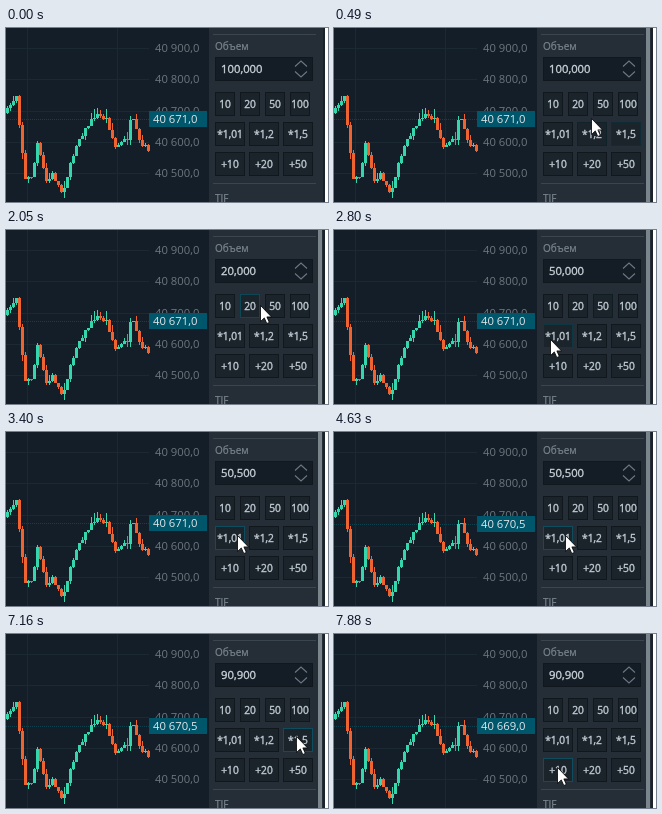
An HTML page that plays this animation: 322x174 px, repeating every 8 s.

```html
<!DOCTYPE html>
<html lang="ru">
<head>
<meta charset="utf-8">
<title>Объем</title>
<style>
html, body { margin: 0; width: 100%; height: 100%; overflow: hidden; background: #fff; }
svg { display: block; width: 322px; height: 174px; }
text { font-family: "Open Sans", "Noto Sans", sans-serif; font-size: 11.3px; }
.axis { fill: #6d777f; }
.label { fill: #7b868f; font-size: 10px; stroke: #7b868f; stroke-width: .2; }
.price { fill: #e3e7ea; }
.value { fill: #c9d1d8; stroke: #c9d1d8; stroke-width: .35; }
.btn { fill: #1b232b; stroke: #10171d; }
.key { fill: #bfc9d1; stroke: #bfc9d1; stroke-width: .4; font-size: 10.2px; text-anchor: middle; }
.glow { fill: none; stroke: #0d4d5d; }
.grid { stroke: #1c2933; }
</style>
</head>
<body>
<svg id="stage" viewBox="0 0 322 174"></svg>
<script>
const LOOP = 8000;
const stage = document.getElementById('stage');

function add(tag, attrs, text, parent = stage) {
  const el = document.createElementNS('http://www.w3.org/2000/svg', tag);
  for (const k in attrs) el.setAttribute(k, attrs[k]);
  if (text) el.textContent = text;
  parent.appendChild(el);
  return el;
}
const rect = (x, y, width, height, rest) => add('rect', { x, y, width, height, ...rest });
const text = (x, y, cls, s, parent) => add('text', { x, y, class: cls }, s, parent);
const path = (d, rest) => add('path', { d, ...rest });
const clamp = v => Math.max(0, Math.min(1, v));
const ease = p => p * p * (3 - 2 * p);

// Chart
rect(0, 0, 204, 174, { fill: '#141e28' });
path('M0 20.5H143M0 51.5H143M0 83.5H143M0 114.5H143M0 145.5H143M21.5 0V174M111.5 0V174', { class: 'grid' });
const priceLine = path('M0 .5H143', { stroke: '#12414e', 'stroke-dasharray': '1 1' });

// Turning points of the price, joined by straight runs with seeded noise
const turns = [[0, 82], [9, 67], [18, 152], [25, 147], [30, 116], [40, 157], [44, 144],
  [55, 165], [70, 113], [88, 87], [99, 91], [108, 119], [121, 110], [124, 86], [133, 117], [144, 122]];
let seed = 7;
const rand = () => (seed = seed * 16807 % 2147483647) / 2147483647;

function trend(x) {
  const i = turns.findIndex(p => p[0] > x);
  const [x0, y0] = turns[i - 1], [x1, y1] = turns[i];
  return y0 + (y1 - y0) * (x - x0) / (x1 - x0);
}

let open = 85;
for (let x = 0; x < 143; x += 3) {
  const close = Math.round(trend(x) + (rand() - .5) * 5);
  const top = Math.min(open, close);
  const bottom = Math.max(open, close, top + 1);
  const high = top - Math.round(rand() * rand() * 9);
  const low = bottom + Math.round(rand() * rand() * 7);
  const fill = close < open ? '#35d6ad' : '#ee6330';
  rect(x + 1, high, 1, low - high, { fill });
  rect(x, top, 3, bottom - top, { fill });
  open = close;
}

for (let i = 0; i < 5; i++)
  text(149, Math.round(24 + i * 31.25), 'axis', `40 ${900 - i * 100},0`);

const tag = add('g', {});
add('rect', { x: 143, y: 83, width: 58, height: 16, fill: '#00566a' }, '', tag);
const price = text(147, 95, 'price', '', tag);

// Order panel
rect(203, 0, 114, 174, { fill: '#252e37' });
path('M207 6.5H310M207 155.5H310', { stroke: '#3b454e' });
text(209, 22, 'label', 'Объем');
text(209, 174, 'label', 'TIF');
rect(209.5, 29.5, 97, 23, { fill: '#141c25', stroke: '#10171d' });
const volume = text(215, 45, 'value', '');
path('M289 38.5L295 33L301 38.5M289 43.5L295 49L301 43.5', { fill: 'none', stroke: '#6b7882', 'stroke-width': 1.1 });
const scrollbar = rect(312, 0, 4, 174, { fill: '#7a848b' });
rect(317, 0, 2, 174, { fill: '#1a222a' });

const buttons = [];
function buttonRow(y, w, step, names) {
  names.forEach((name, i) => {
    const x = 209 + i * step;
    const box = { x: x + .5, y: y + .5, width: w - 1, height: 23 };
    add('rect', { ...box, class: 'btn' });
    const glow = add('rect', { ...box, class: 'glow' });
    text(x + w / 2, y + 15.5, 'key', name);
    buttons.push({ x, y, w, glow });
  });
}
buttonRow(64, 20, 25, ['10', '20', '50', '100']);
buttonRow(94, 30, 34, ['*1,01', '*1,2', '*1,5']);
buttonRow(124, 30, 34, ['+10', '+20', '+50']);

const cursor = path('M.5 .5V16.5L4.3 12.9L6.8 18.5L9.3 17.4L6.9 11.9H11.5Z',
  { fill: '#fff', stroke: '#000', 'stroke-width': .8 });

// Pointer travel, and what a click at the end of it does to the volume
const visits = [
  { from: 50, to: 800, x: 223, y: 73, click: 860, apply: () => 10000 },
  { from: 1170, to: 1290, x: 242, y: 75, click: 1450, apply: () => 20000 },
  { from: 1990, to: 2130, x: 272, y: 75, click: 2440, apply: () => 50000 },
  { from: 2550, to: 2800, x: 216, y: 109 },
  { from: 2920, to: 3180, x: 231, y: 103, click: 3330, apply: v => v * 1.01 },
  { from: 4630, to: 4770, x: 260, y: 103, click: 4930, apply: v => v * 1.2 },
  { from: 5840, to: 6010, x: 290, y: 102, click: 6220, apply: v => v * 1.5 },
  { from: 7160, to: 7860, x: 223, y: 133 }
];

function cursorAt(t) {
  let x = 316, y = 118;
  for (const v of visits) {
    const p = ease(clamp((t - v.from) / (v.to - v.from)));
    x += (v.x - x) * p;
    y += (v.y - y) * p;
  }
  return [Math.round(x), Math.round(y)];
}

function volumeAt(t) {
  const total = visits.reduce((sum, v) => t >= v.click ? v.apply(sum) : sum, 100000);
  return Math.round(total).toString().replace(/(\d{3})$/, ',$1');
}

// Share of the last 200 ms the pointer spent over a button
function hover({ x, y, w }, trail) {
  const hits = trail.filter(([cx, cy]) => cx >= x && cx < x + w && cy >= y && cy < y + 24);
  return hits.length / trail.length;
}

function draw(t) {
  const shown = t >= 100 ? 'visible' : 'hidden';
  scrollbar.setAttribute('visibility', shown);
  cursor.setAttribute('visibility', shown);
  cursor.setAttribute('transform', `translate(${cursorAt(t)})`);
  volume.textContent = volumeAt(t);
  price.textContent = '40 ' + (t < 3490 ? '671,0' : t < 7520 ? '670,5' : '669,0');
  const drop = t < 3490 ? 0 : 1;
  tag.setAttribute('transform', `translate(0 ${drop})`);
  priceLine.setAttribute('transform', `translate(0 ${91 + drop})`);
  const trail = Array.from({ length: 10 }, (_, i) => cursorAt(t - i * 20));
  for (const b of buttons) b.glow.setAttribute('opacity', hover(b, trail));
}

const begin = performance.now();
function tick() {
  draw((performance.now() - begin) % LOOP);
  requestAnimationFrame(tick);
}
tick();
</script>
</body>
</html>
```
